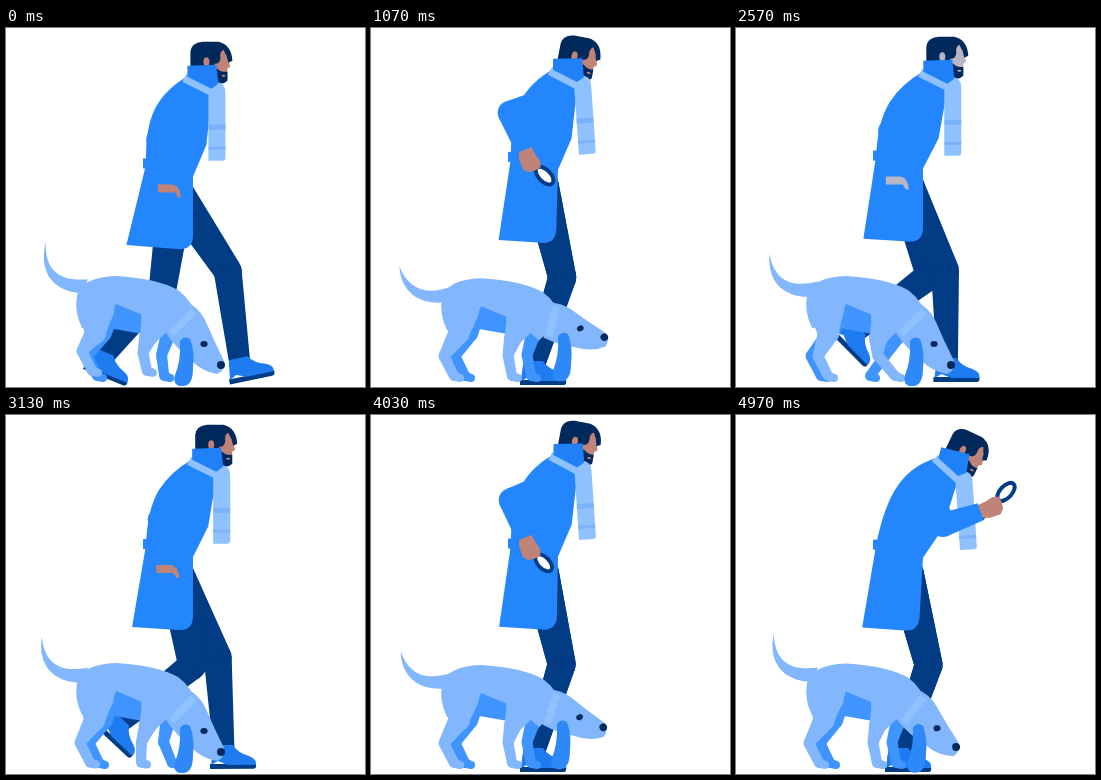
Write an HTML page with a canvas that moves like this. It is 359 by 359 pixels and loops after 5000 ms.

```html
<!DOCTYPE html>
<html lang="en">
<head>
<meta charset="utf-8">
<title>Detective and dog</title>
<style>
html, body { margin: 0; width: 100%; height: 100%; overflow: hidden; background: #fff; }
canvas { display: block; width: 100vw; height: 100vh; }
</style>
</head>
<body>
<canvas id="stage" width="359" height="359"></canvas>
<script>
const ctx = document.getElementById('stage').getContext('2d');
const COAT = '#2486fd', COLLAR = '#1f80f7', NAVY = '#013c84', HAIR = '#02295c',
  SCARF = '#8fc1ff', BAND = '#7cb2fa', DOG = '#82b6fd', DOG_FAR = '#4094fd', EAR = '#2f88f8', SHOE = '#1f7cf0';
const LOOP = 5000, ROUTINE = 3000, STEP = 588, RAD = Math.PI / 180;

const mix = (a, b, k) => a + (b - a) * k;
const mixAll = (a, b, k) => a.map((v, i) => mix(v, b[i], k));
const clamp = (x, top = 1) => Math.max(0, Math.min(top, x));
const ease = x => x * x * (3 - 2 * x);
const ramp = (from, to, t) => ease(clamp((t - from) / (to - from)));
const bump = (mid, width, t) => ease(clamp(1 - Math.abs(t - mid) / width));
const wave = x => Math.sin(Math.PI * x);
const polar = (len, deg) => [-len * Math.sin(deg * RAD), len * Math.cos(deg * RAD)];

// Poses: neck x, y, hand x, y, lens turn, lens size
const DRAW = [197, 41, 158, 132, 45, 1];
const DEEP = [240, 83, 258, 142, -30, 1];
const RISE = [217, 46, 255, 93, -47, 1];

const stillness = t => ramp(650, 900, t) - ramp(2160, 2400, t) + ramp(3700, 3960, t);

function shape(d, color) {
  ctx.fillStyle = color;
  ctx.fill(new Path2D(d));
}
function oval(x, y, rx, ry, color) {
  ctx.fillStyle = color;
  ctx.beginPath();
  ctx.ellipse(x, y, rx, ry, 0, 0, 7);
  ctx.fill();
}
function line(x1, y1, x2, y2, w, color) {
  ctx.strokeStyle = color;
  ctx.lineWidth = w;
  ctx.beginPath();
  ctx.moveTo(x1, y1);
  ctx.lineTo(x2, y2);
  ctx.stroke();
}
function placed([x, y], turn, draw, size = 1) {
  ctx.save();
  ctx.translate(x, y);
  ctx.rotate(turn * RAD);
  ctx.scale(size, size);
  draw();
  ctx.restore();
}
// Point at a local offset in a frame turned about an origin
function turned([ox, oy], deg, x, y) {
  const c = Math.cos(deg * RAD), s = Math.sin(deg * RAD);
  return [ox + x * c - y * s, oy + x * s + y * c];
}
// Middle joint of a two-part limb; side picks the way it bends
function joint([ax, ay], [bx, by], la, lb, side) {
  const dx = bx - ax, dy = by - ay, d = Math.hypot(dx, dy) || 1;
  const along = (la * la - lb * lb + d * d) / (2 * d);
  const out = side * Math.sqrt(Math.max(0, la * la - along * along));
  return [ax + (dx * along - dy * out) / d, ay + (dy * along + dx * out) / d];
}
// Tapered chain of [x, y, radius]
function limb(joints, color, flatEnd) {
  joints.forEach(([x, y, r], i) => {
    if (!flatEnd || i < joints.length - 1) oval(x, y, r, r, color);
    if (!i) return;
    const [px, py, pr] = joints[i - 1], d = Math.hypot(x - px, y - py) || 1;
    const nx = (py - y) / d, ny = (x - px) / d;
    shape(`M${px + nx * pr} ${py + ny * pr}L${x + nx * r} ${y + ny * r}
      L${x - nx * r} ${y - ny * r}L${px - nx * pr} ${py - ny * pr}Z`, color);
  });
}

function manLeg(phase, still, hip) {
  const u = phase % 2, s = u - 1;
  let x, lift, turn;
  if (u < 1) {
    const roll = ramp(0.7, 1, u);
    x = mix(234, 97, u);
    lift = 5 * roll;
    turn = 20 * roll - 12 * clamp(1 - u / 0.12);
  } else {
    x = mix(97, 234, s);
    lift = 5 * (1 - s) + 35 * wave(s ** 0.7);
    turn = 20 * (1 - s) + 35 * wave(s ** 0.6) - 12 * s;
  }
  const ankle = [mix(x, 163, still), mix(335 - lift, 338, still)];
  const knee = joint(hip, ankle, 93, 93, -1);
  limb([[...hip, 18], [...knee, 14], [...ankle, 10.5]], NAVY, true);
  placed(ankle, turn * (1 - still), () => {
    shape('M-14 14L32 14Q33 19 29 19L-14 19Z', NAVY);
    shape('M-11 0L-10 -5L9 -5Q14 3 25 6Q33 9 32 15L4 15L-6 11L-13 15Z', SHOE);
  });
}

function man(t) {
  const u = t % ROUTINE, still = stillness(t);
  const step = Math.min(t / STEP, 1.5) + clamp((t - 2180) / STEP, 3);
  const pass = 1.6 * wave(step % 1) ** 0.6;

  const walk = [196 + 6 * pass, 48 - 5 * pass, 163 - 2 * pass, 162 - 8 * pass, 60, 0];
  let pose = mixAll(walk, DRAW, ramp(780, 1070, u));
  pose = mixAll(pose, DEEP, ramp(1080, 1310, u));
  pose = mixAll(pose, RISE, ramp(1770, 1970, u));
  pose = mixAll(pose, walk, ramp(1970, 2230, u));
  const [nx, bodyY, handX, handY, lensTurn, lens] = pose;
  const ny = bodyY - 6 * bump(960, 110, u) - 5 * bump(2090, 110, u);

  // The rest of the body follows from neck and hand
  const neck = [nx, ny], hand = [handX, handY], tilt = 0.75 * (nx - 196) * still;
  const at = (x, y) => turned(neck, tilt, x, y);
  const hip = [170, mix(166 - 8 * pass, 159 + 0.16 * (ny - 42), still)];
  const shoulder = at(-18, 31), elbow = joint(shoulder, hand, 42, 51, 1);
  const skin = `rgb(${mixAll([191, 131, 120], [184, 182, 196], ramp(1300, 1800, t) - ramp(2600, 3000, t))})`;

  manLeg(step + 1, still, hip);
  manLeg(step, still, hip);

  placed(neck, tilt + 10 * lens, () => {
    shape('M0 -28L22 -29L25 -18L28 -9L25 -7L25 4L10 8L0 2Z', skin);
    shape('M11 -8L15 -7Q19 -3 25 -4L25 5Q20 10 14 7L9 2Z', HAIR);
    shape('M-12 -6L-12 -24Q-11 -33 0 -34L16 -34Q29 -31 30 -15L26 -13Q25 -20 21 -26Q17 -24 18 -18Q18 -12 12 -12L11 -2L-6 -4Z', HAIR);
    oval(4, -14, 3, 4.5, skin);
    oval(21, 0, 2, 1, skin);
  });

  // Coat
  const back = at(-37, 13), waist = [140, hip[1] - 29], front = [187, hip[1] - 17], throat = at(10, 13);
  const [dx, dy] = [waist[0] - back[0], waist[1] - back[1]], len = Math.hypot(dx, dy);
  const spine = [mix(back[0], waist[0], 0.55) - 10 * dy / len, mix(back[1], waist[1], 0.55) + 10 * dx / len];
  const [ex, ey] = polar(83, mix(14 - 5 * pass, 9 + 0.2 * (ny - 43), still));
  const [fx, fy] = polar(74, 0.33 * (ny - 36) * still);
  const hemBack = [waist[0] + ex, waist[1] + ey], hemFront = [front[0] + fx, front[1] + fy];
  const chest = mixAll(front, throat, 0.38);
  shape(`M${at(-14, 0)}Q${back} ${mixAll(back, spine, 0.5)}Q${spine} ${waist}L${hemBack}
    L${mixAll(hemFront, hemBack, 0.25)}Q${hemFront} ${mixAll(hemFront, front, 0.2)}
    L${front}L${chest[0] + 6} ${chest[1] + 2}L${throat}Z`, COAT);
  ctx.fillStyle = COAT;
  ctx.fillRect(waist[0] - 3, waist[1] - 6, 7, 10);

  // Scarf and collar
  placed(at(15, 12), -4 * lens * (1 - clamp((ny - 45) / 20)), () => {
    shape('M-9 -6L0 -6Q8 -4 8 4L8 70Q8 73 5 73L-9 73Z', SCARF);
    ctx.fillStyle = BAND;
    ctx.fillRect(-9, 37, 17, 5);
    ctx.fillRect(-9, 59, 17, 3);
  });
  placed(neck, tilt, () => {
    line(-18, 2, 12, 17, 9, SCARF);
    shape('M-15 -10L14 -11L16 8L9 13L-15 1Z', COLLAR);
  });

  // Arm and magnifier
  const holding = lens > 0.25, reach = Math.hypot(handX - elbow[0], handY - elbow[1]);
  if (holding) {
    placed(hand, lensTurn, () => {
      line(-14, 0, 11, 0, 5, NAVY);
      ctx.beginPath();
      ctx.ellipse(22, 0, 11, 6, 0, 0, 7);
      ctx.fillStyle = '#fff';
      ctx.fill();
      ctx.lineWidth = 4;
      ctx.strokeStyle = NAVY;
      ctx.stroke();
    }, lens);
    placed(hand, Math.atan2(handY - elbow[1], handX - elbow[0]) / RAD, () =>
      shape('M-13 -7L-3 -8L5 -10L11 -8Q13 -3 11 5L7 9L-4 9L-13 6Z', skin));
  }
  limb([[...shoulder, 13], [...elbow, 12], [...mixAll(elbow, hand, 1 - 11 / reach), 9]], COAT, true);
  if (!holding) placed(hand, 0, () => shape('M-11 -5L4 -5Q11 -4 12 8L9 8L6 3L-11 3Z', skin));
}

function dog(t) {
  const u = t % ROUTINE, walk = 1 - stillness(t);
  const raise = ramp(600, 1280, u) - ramp(1650, 2080, u);
  const phase = 2 * Math.PI * (t - 370) / 1100, swing = Math.cos(phase);
  const nearLift = 6 * walk * clamp(-Math.sin(phase)), farLift = 6 * walk * clamp(Math.sin(phase));
  const paw = (x, up) => [[x, 348 - up, 5], [x + 6, 350 - up, 4]];
  const hind = (x, dx, up, color, r) => limb([[x + 6, 282, r], [x + 4 + dx * 0.5, 305, r * 0.6],
    [x - 11 + dx, 328 - up, 5.5], ...paw(x - 1 + dx, up)], color);
  const fore = (x, dx, up, color, r) => limb([[x + 12, 288, r], [x + 1, 310, r * 0.5],
    [x - 4 + dx * 0.25, 327 - up * 0.5, 5.5], ...paw(x + dx, up)], color);

  hind(95, -(5 + 4 * swing) * walk, farLift, DOG_FAR, 14);
  fore(160, -(10 + 16 * swing) * walk, farLift, DOG_FAR, 14);
  shape('M102 268L152 284L137 306L108 301Z', DOG_FAR);
  hind(84, (5 + 4 * swing) * walk, nearLift, DOG, 18);
  fore(141, (6 + 12 * swing) * walk, nearLift, DOG, 18);

  // Body and tail
  placed([0, 3 * raise], 0, () => {
    const k = raise + walk * (5.5 - 5.5 * Math.sin(phase + 190 * RAD)) / 15;
    const tip = [40 - 15 * k, 213 + 30 * k];
    shape(`M${tip}C${33 - 4 * k} ${242 + 23 * k} ${45 + k} ${263 + 16 * k} 76 ${265 + 9 * k}
      L82 ${251 + 6 * k}C${56 + k} ${253 + 16 * k} ${39 - k} ${245 + 20 * k} ${tip}Z`, DOG);
    shape('M71 268Q76 249 110 248Q150 250 172 262Q187 273 190 290L168 310L146 291L110 276L102 298L76 300Q68 283 71 268Z', DOG);
  });

  // Head
  const nape = [178, 285], turn = -40 * raise;
  placed(nape, turn, () => {
    shape('M-12 -17Q14 -10 22 9Q30 28 40 48Q42 57 33 61Q18 59 6 46Q-8 35 -18 20Z', DOG);
    line(10, -2, -13, 21, 8, SCARF);
    oval(37, 52, 4, 4, HAIR);
    oval(20, 31, 3.6, 3, HAIR);
  }, 1 - 0.07 * raise);
  placed(turned(nape, turn, 2, 26), 0, () =>
    shape('M-6 2Q-2 -4 4 0Q9 13 7 29Q7 46 -2 47Q-14 48 -11 36Q-5 22 -6 2Z', EAR));
}

const start = performance.now();
function frame() {
  const t = (performance.now() - start) % LOOP;
  ctx.fillStyle = '#fff';
  ctx.fillRect(0, 0, 359, 359);
  man(t);
  dog(t);
  requestAnimationFrame(frame);
}
frame();
</script>
</body>
</html>
```
